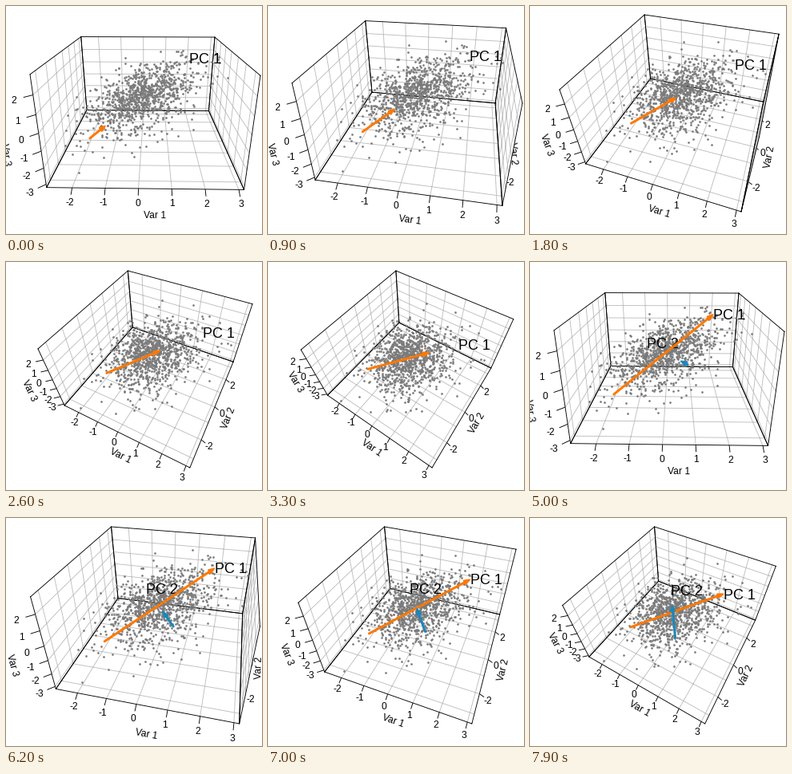
A matplotlib script for the animation above (8000 ms loop, 320 by 286 pixels).

```python
import itertools

import matplotlib.pyplot as plt
import numpy as np
from matplotlib.animation import FuncAnimation

W, H, DPI = 320, 286, 64
PT = 72 / DPI                          # points per pixel
FRAMES, CYCLE = 80, 50
BOX = (30, 11, 318, 258)               # area the projected cube must fit

LIMS = np.array([[-2.775, 3.155], [-3.43, 3.5], [-3.2, 2.99]])
HALF = np.array([1, 1, 0.6])           # half sizes of the drawn cube
EYE = 2 + np.sqrt(3)
GRID = [range(-2, 4), range(-3, 4), range(-3, 3)]
TICKS = [range(-2, 4), (-2, 0, 2), range(-3, 3)]
SIDES = [(0, -1, -1), (1, 0, -1), (-1, -1, 0)]   # cube edge of each axis

ORANGE, BLUE = "#ff7800", "#1b87bb"
PC1 = np.array([1.82, 1.07, 2.18])
PC2 = np.array([-0.78, 1.31, -0.02])


def make_points(count=1000):
    e1, e2 = (v / np.linalg.norm(v) for v in (PC1, PC2))
    basis = np.array([e1, e2, np.cross(e1, e2)])
    raw = np.random.default_rng(11).normal(size=(count, 3))
    raw = (raw - raw.mean(0)) / raw.std(0)
    pts = raw * (1.32, 1.0, 0.44) @ basis
    return pts[np.all((pts > LIMS[:, 0]) & (pts < LIMS[:, 1]), axis=1)]


def to_cube(p):
    """Data units to the cube, where every side runs from -HALF to HALF."""
    return (np.asarray(p, float) - LIMS.mean(1)) / (np.ptp(LIMS, axis=1) / 2) * HALF


def cube_value(axis, value):
    lo, hi = LIMS[axis]
    return (2 * value - lo - hi) / (hi - lo) * HALF[axis]


class Camera:
    def __init__(self, theta, phi):
        t, f = np.radians((theta, phi))
        self.st, self.ct, self.sf, self.cf = np.sin(t), np.cos(t), np.sin(f), np.cos(f)
        self.eye = EYE * np.array([self.cf * self.st, -self.cf * self.ct, self.sf])
        flat = self.flat(np.array(list(itertools.product((-1, 1), repeat=3))) * HALF)
        lo, hi = flat.min(0), flat.max(0)
        x0, y0, x1, y1 = BOX
        self.scale = min((x1 - x0) / (hi[0] - lo[0]), (y1 - y0) / (hi[1] - lo[1]))
        self.mid = (lo + hi) / 2
        self.center = np.array([(x0 + x1) / 2, (y0 + y1) / 2])

    def flat(self, p):
        x, y, z = np.asarray(p, float).T
        depth = y * self.ct - x * self.st
        w = EYE - z * self.sf + depth * self.cf
        return np.stack([(x * self.ct + y * self.st) / w,
                         -(z * self.cf + depth * self.sf) / w], axis=-1)

    def __call__(self, p):
        return self.center + (self.flat(p) - self.mid) * self.scale


POINTS = to_cube(make_points())

fig = plt.figure(figsize=(W / DPI, H / DPI), dpi=DPI, facecolor="white")
ax = fig.add_axes([0, 0, 1, 1])
plt.rcParams["font.family"] = "Liberation Sans"


def segments(cam, pairs, color, width, z):
    xy = [np.vstack([cam(pair), [[np.nan, np.nan]]]) for pair in pairs]
    ax.plot(*np.vstack(xy).T, color=color, lw=width * PT, zorder=z,
            solid_capstyle="round")


def label(xy, text, px, z, ha="center", angle=0):
    ax.text(*xy, text, size=px * PT, ha=ha, va="center_baseline", zorder=z,
            rotation=angle, rotation_mode="anchor", color="black")


def draw_axis(cam, axis):
    side = np.array(SIDES[axis], float)

    def at(value, out):
        p = side * HALF * (1 + out)
        p[axis] = cube_value(axis, value)
        return p

    ticks = TICKS[axis]
    segments(cam, [(at(v, 0), at(v, 0.06)) for v in ticks], "black", 0.9, 1)
    for v in ticks:
        label(cam(at(v, 0.12)), str(v), 12, 1)
    (xa, ya), (xb, yb) = cam([at(ticks[0], 0), at(ticks[-1], 0)])
    angle = np.degrees(np.arctan2(ya - yb, xb - xa))
    angle = (angle + 90) % 180 - 90
    label(cam(at((ticks[0] + ticks[-1]) / 2, 0.22)), f"Var {axis + 1}", 12, 1,
          angle=angle)


def draw_face(cam, axis, sign):
    a, b = [k for k in range(3) if k != axis]

    def at(u, v):
        p = np.zeros(3)
        p[axis], p[a], p[b] = sign * HALF[axis], u, v
        return p

    ha, hb = HALF[a], HALF[b]
    ring = [at(-ha, -hb), at(ha, -hb), at(ha, hb), at(-ha, hb)]
    ax.fill(*cam(ring).T, color="white", lw=0, zorder=2)
    lines = [(at(u, -hb), at(u, hb)) for u in (cube_value(a, t) for t in GRID[a])]
    lines += [(at(-ha, v), at(ha, v)) for v in (cube_value(b, t) for t in GRID[b])]
    segments(cam, lines, "#bebebe", 0.9, 3)
    segments(cam, zip(ring, ring[1:] + ring[:1]), "black", 0.9, 4)


def draw_arrow(cam, vec, grown, color, z):
    start, tip = cam(to_cube([-vec, vec * (2 * grown - 1)]))
    length = np.hypot(*(tip - start))
    along = (tip - start) / length
    across = np.array([-along[1], along[0]])
    neck = tip - along * min(6, length)
    ax.plot(*np.array([start, neck]).T, color=color, lw=3 * PT, zorder=z,
            solid_capstyle="round")
    point, back = tip - along, tip - along * 8
    ax.fill(*np.array([point, back + across * 2.5, back - across * 2.5]).T,
            fc=color, ec=color, lw=2 * PT, joinstyle="round", zorder=z)


def draw(n):
    ax.clear()
    ax.set(xlim=(0, W), ylim=(H, 0))
    ax.axis("off")
    part, step = divmod(n, CYCLE)
    cam = Camera(step + 1, step + 21)
    for axis in range(3):
        draw_axis(cam, axis)
    for axis, sign in itertools.product(range(3), (-1, 1)):
        if sign * cam.eye[axis] < HALF[axis]:
            draw_face(cam, axis, sign)
    ax.plot(*cam(POINTS).T, "o", ms=2.7 * PT, mew=0, color="#7a7a7a", zorder=5)

    grown = 0.15 + 0.85 * step / (CYCLE - 1)
    arrows = [(PC1, ORANGE), (PC2, BLUE)][:part + 1]
    for i, (vec, color) in enumerate(arrows):
        label(cam(to_cube(vec)), f"PC {i + 1}", 18, 6, ha="left")
        draw_arrow(cam, vec, grown if i == part else 1, color, 7 + i)
    return []


anim = FuncAnimation(fig, draw, frames=FRAMES, interval=100, init_func=lambda: [],
                     repeat=True, repeat_delay=0)
plt.show()
```
